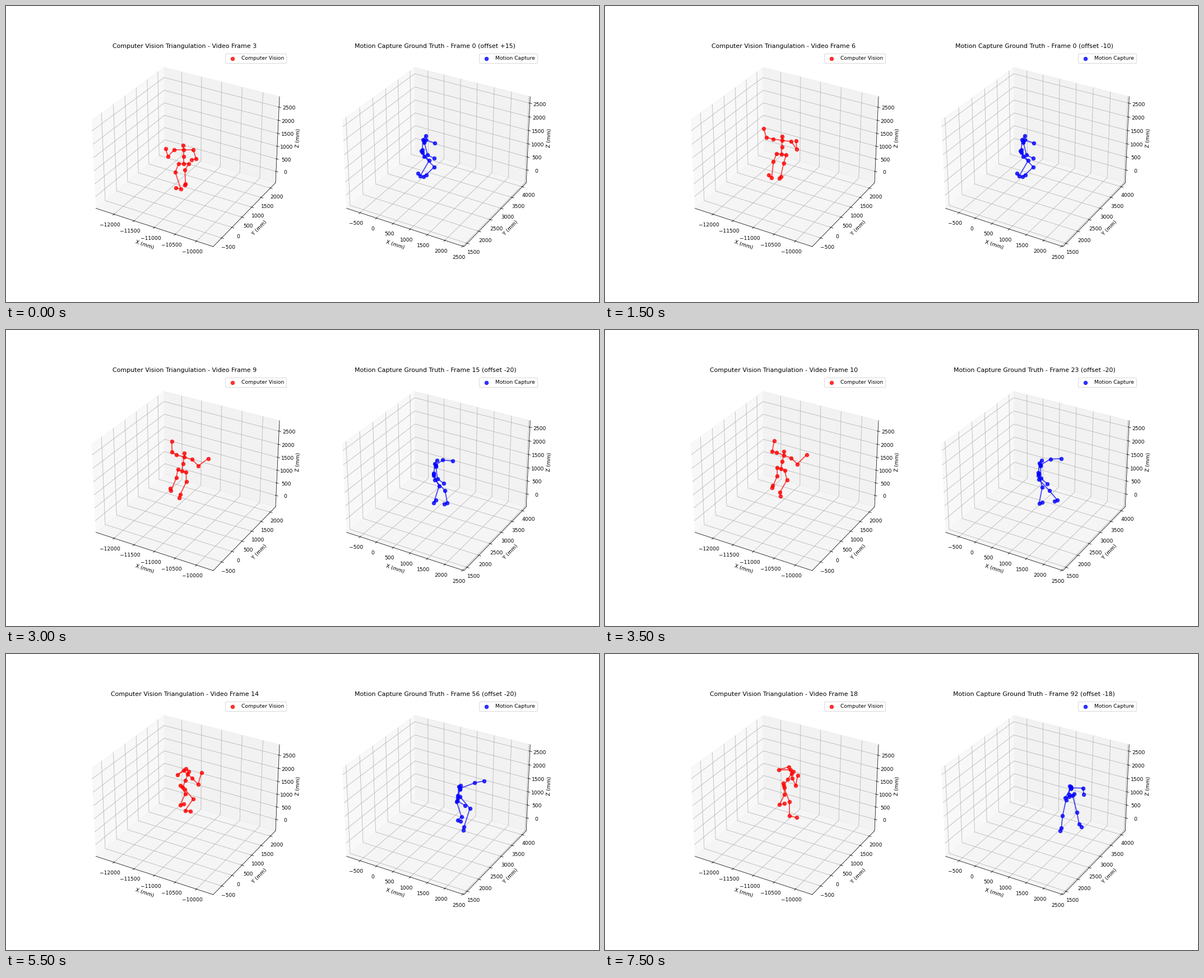
Recreate the animation shown at these times as a matplotlib script. Size 1058 by 529 pixels, loop 8 s.

```python
import numpy as np
import matplotlib.pyplot as plt
from matplotlib.animation import FuncAnimation
from matplotlib.collections import LineCollection
from matplotlib.ticker import MultipleLocator

W, H = 1058, 529
FIRST, STEPS = 3, 16
LAST_CAPTURE = 92
SEARCH = 20                              # widest offset tried when pairing
CLOSER = {13: -8, 17: -9, 18: -18}       # pairs found inside that range

fig = plt.figure(figsize=(16, 8), dpi=W / 16)


def make_axes(slot, xlim, ylim, zlim):
    ax = fig.add_subplot(1, 2, slot, projection="3d")
    ax.set(xlim=xlim, ylim=ylim, zlim=zlim,
           xlabel="X (mm)", ylabel="Y (mm)", zlabel="Z (mm)")
    for axis in (ax.xaxis, ax.yaxis, ax.zaxis):
        axis.set_major_locator(MultipleLocator(500))
    return ax


# Points on the stage are complex numbers, y pointing down; t runs 0 to 1.

def glide(t, values):
    """Pass through evenly spaced values."""
    return np.interp(t, np.linspace(0, 1, len(values)), values)


def pair(centre, rx, ry, turn):
    """Left and right ends of a girdle turning about the spine."""
    arm = rx * np.cos(turn) + 1j * ry * np.sin(turn)
    return centre + arm, centre - arm


def limb(start, end, t, segments):
    """Chain of segments, each given by its lengths and angles over time."""
    chain = [start, end]
    for lengths, angles in segments:
        turn = np.exp(-1j * np.radians(glide(t, angles)))
        chain.append(chain[-1] + glide(t, lengths) * turn)
    return chain


def camera_trunk(t):
    pelvis = 317 - 14 * t + 16 * t**2 + 1j * (235 + 47 * (1 - t)**2)
    spine = -25j * np.exp(0.58j * t**1.5)
    neck = pelvis + spine
    head = neck - 1 + 4 * t + 1j * (4.5 * t - 8.5)
    turn = np.pi + 1.5 * t
    return ([head, neck, pelvis + 0.54 * spine, pelvis],
            pair(neck, 17, 7.5, turn), pair(pelvis, 9, 4.3, turn))


def capture_trunk(t):
    pelvis = 742.5 + 135 * t - 50 * t**2 + 1j * (261.5 - 7 * t)
    spine = 1.5 - 1j * (22.5 - 4 * t)
    neck = pelvis + spine
    head = neck + 5 - 3 * t + 1j * (7.5 * t - 7)
    turn = 1.3 + t
    return ([head, neck, pelvis + 0.2 * spine, pelvis],
            pair(neck + 2.2 + 4j, 1, 1, turn),
            pair(pelvis + 1 + 2.5j, 9, 5, turn))


class Skeleton:
    def __init__(self, layer, color, trunk, arms, legs):
        self.trunk, self.arms, self.legs = trunk, arms, legs
        self.bones = LineCollection([], colors=color, linewidths=2, alpha=0.7)
        layer.add_collection(self.bones)
        self.dots = layer.scatter([], [], s=50, c=color, alpha=0.8, zorder=3)

    def pose(self, t):
        spine, shoulders, hips = self.trunk(t)
        chains = [spine]
        for shoulder, arm in zip(shoulders, self.arms):
            chains.append(limb(spine[1], shoulder, t, arm))
        for hip, leg in zip(hips, self.legs):
            chains.append(limb(spine[3], hip, t, leg))
        joints = spine + [p for c in chains[1:] for p in c[1:]]
        self.bones.set_segments([[(a.real, a.imag), (b.real, b.imag)]
                                 for c in chains for a, b in zip(c, c[1:])])
        self.dots.set_offsets([(p.real, p.imag) for p in joints])


left = make_axes(1, (-12460, -9609), (-900, 2290), (-455, 2893))
right = make_axes(2, (-915, 2536), (1367, 4195), (-497, 2738))

layer = fig.add_axes([0, 0, 1, 1], zorder=5)
layer.axis("off")

# Each segment: lengths in pixels, then angles in degrees
camera = Skeleton(
    layer, "red", camera_trunk,
    arms=[[((16, 7, 21), (227, 126, 225, 180)),
           ((14, 20, 18), (108, 105, 40, 15))],
          [((17, 15), (-72, -44, -42, -64)),
           ((8, 25, 18), (190, 28, 72, 80))]],
    legs=[[((16, 15, 20), (-112, -112, -54, -84)),
           ((32, 23, 21), (-72, -112, -114, -116)),
           ((9, 4, 9), (165, 130, 10, 14))],
          [((13, 18, 27), (-121, -100, -45, -69)),
           ((25, 25), (-88, -111, -133, -90)),
           ((2, 7, 13), (-110, -130, -5, -13))]])

capture = Skeleton(
    layer, "blue", capture_trunk,
    arms=[[((23, 19), (-76, -120)),
           ((13, 18), (-27, -41, -45, -15, 24))],
          [((4, 27, 28, 21), (50, 30, 30, 9, -1)),
           ((18, 19, 11), (-20, 2, 17, 5, -82))]],
    legs=[[((26, 29), (-46, -47, -61, -87, -102)),
           ((20, 24, 6, 22), (-135, -50, -122, -160, -96)),
           ((6, 6), (-149, -165, 0, -46, -116))],
          [((22, 31), (-51, -75, -42, -61, -76)),
           ((32, 29, 36, 21), (-120, -101, -160, -40, -79)),
           ((6, 6), (130, 16, -55, -165, -50))]])
layer.set(xlim=(0, W), ylim=(H, 0))

left.legend([camera.dots], ["Computer Vision"], loc="upper right")
right.legend([capture.dots], ["Motion Capture"], loc="upper right")


def matched(video):
    """Capture frame paired with a video frame, and its offset."""
    base = video * 25 // 3 - 40
    frame = max(0, base + CLOSER.get(video, -SEARCH))
    return frame, frame - base


def update(i):
    video = FIRST + i
    frame, offset = matched(video)
    camera.pose(i / (STEPS - 1))
    capture.pose(frame / LAST_CAPTURE)
    left.set_title(f"Computer Vision Triangulation - Video Frame {video}")
    right.set_title(
        f"Motion Capture Ground Truth - Frame {frame} (offset {offset:+d})")
    return []


anim = FuncAnimation(fig, update, frames=STEPS, interval=500, repeat=True,
                     repeat_delay=0, blit=False)
plt.show()
```
